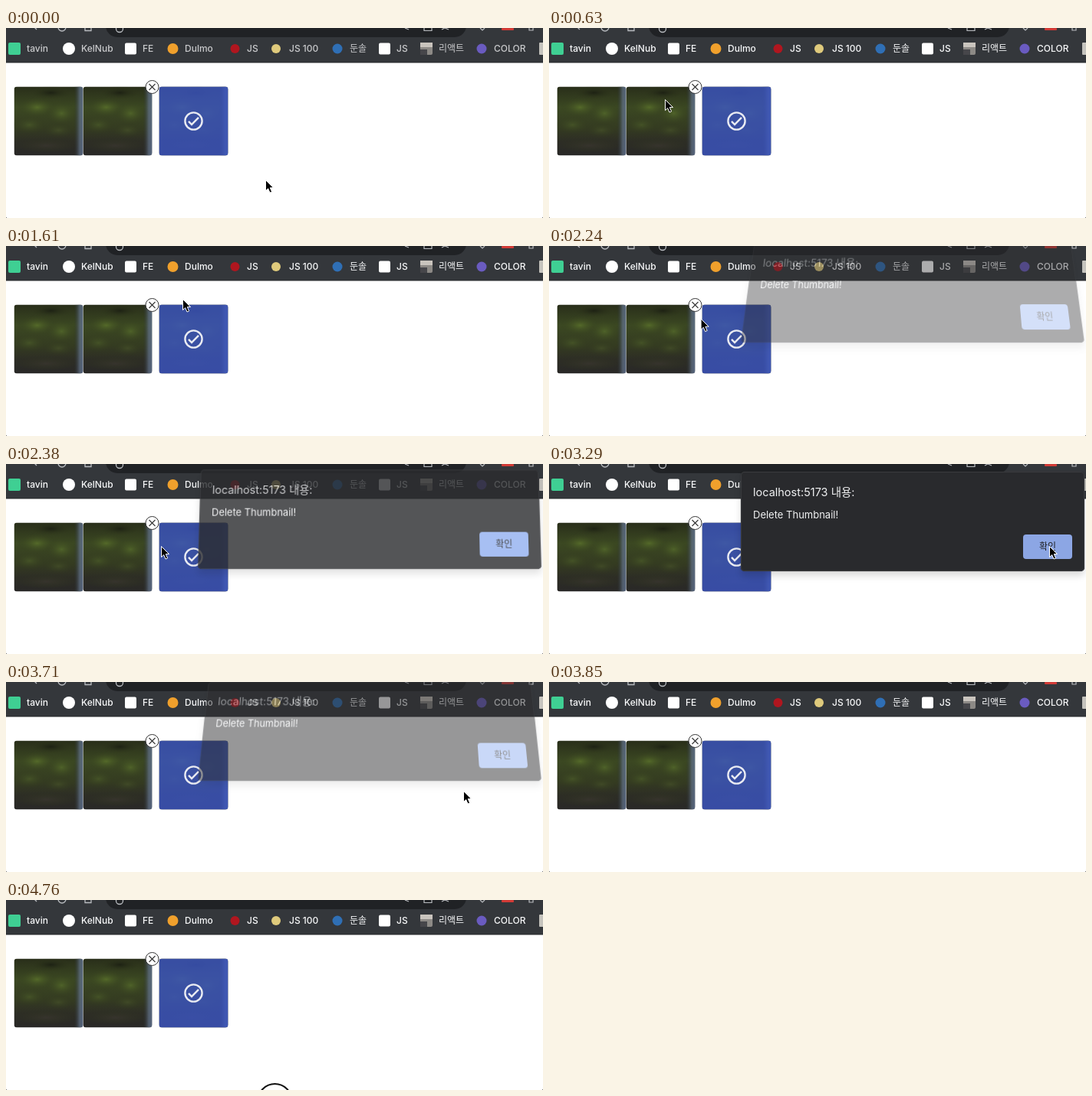
An HTML page with a canvas that plays this animation: 700 px wide and 248 px high, repeating every 4.83 s.

```html
<!DOCTYPE html>
<html lang="ko">
<head>
<meta charset="utf-8">
<title>Thumbnail delete demo</title>
<style>
  html, body { margin: 0; width: 100%; height: 100%; overflow: hidden; background: #fff; }
  body { position: relative; font-family: Inter, "Noto Sans CJK KR", "Noto Sans CJK", sans-serif; }
  canvas { position: absolute; left: 0; top: 0; }
  #dialog {
    position: absolute; left: 250px; top: 10px; width: 448px; height: 130px;
    border-radius: 5px; background: #292a2d; color: #f1f2f3;
    box-shadow: inset 0 0 0 1px #3a3b3e, 0 0 1px #222, 0 6px 10px rgba(0, 0, 0, .14);
    transform-origin: 50% 100%;
  }
  #dialog * { position: absolute; white-space: nowrap; }
  #title { left: 16px; top: 17px; font-size: 14.5px; line-height: 20px; }
  #message { left: 16px; top: 47px; font-size: 13px; line-height: 18px; }
  #ok {
    left: 368px; top: 82px; width: 64px; height: 32px; border-radius: 4px;
    background: #91aff0; color: #202124; font-size: 12px; line-height: 31px; text-align: center;
  }
  #ok.hover { background: #8ca6e4; }
  #cursor { position: absolute; left: 0; top: 0; overflow: visible; }
</style>
</head>
<body>
<canvas id="page" width="700" height="248"></canvas>
<div id="dialog">
  <div id="title">localhost:5173 내용:</div>
  <div id="message">Delete Thumbnail!</div>
  <div id="ok">확인</div>
</div>
<svg id="cursor" width="14" height="20">
  <path d="M.5 .5V14.6L3.7 11.6 6 17 8.6 15.9 6.3 10.6H10.6Z" fill="#000" stroke="#fff" stroke-width="1"/>
</svg>
<script>
const LOOP = 4830, STEP = 70;
const $ = id => document.getElementById(id);
const ctx = $('page').getContext('2d');
const dialog = $('dialog'), cursor = $('cursor'), ok = $('ok');

// time, x, y of the pointer tip
const PATH = [
  [0, 338, 198], [70, 325, 190], [350, 176, 112], [420, 176, 112], [630, 151, 93],
  [770, 148, 90], [840, 148, 90], [1120, 180, 84], [1400, 234, 72], [1470, 236, 70],
  [1540, 236, 70], [1610, 230, 69], [1750, 194, 75], [1890, 194, 75], [1960, 191, 76],
  [2030, 191, 76], [2380, 202, 107], [2590, 232, 183], [2800, 350, 219], [3010, 560, 195],
  [3150, 640, 135], [3220, 650, 113], [3290, 652, 107], [3500, 652, 107], [3640, 627, 120],
  [3710, 596, 142], [3780, 540, 213], [3850, 500, 260]
];

// label, text x, icon centre x, icon radius, icon colour, square icon
const BOOKMARKS = [
  ['tavin', 27, 11, 8, '#3fcf93', true],
  ['KelNub', 98, 82, 8, '#fff', false],
  ['FE', 178, 162.5, 7.5, '#fff', true],
  ['Dulmo', 233, 217.5, 7, '#f0a02c', false],
  ['JS', 314, 298.5, 6, '#b0161f', false],
  ['JS 100', 369, 352, 6, '#dfca7c', false],
  ['둔솔', 448, 432, 6.5, '#2f6fb5', false],
  ['JS', 509, 493.5, 7.5, '#fff', true],
  ['리액트', 564, 548, 8, '#8d8a86', true],
  ['COLOR', 636, 620, 6.5, '#6a5bc0', false]
];

const clamp = v => Math.max(0, Math.min(1, v));
const smooth = v => { v = clamp(v); return v * v * (3 - 2 * v); };

function box(x, y, w, h, r, fill) {
  ctx.fillStyle = fill;
  ctx.beginPath();
  ctx.roundRect(x, y, w, h, r);
  ctx.fill();
}

function disc(x, y, r, fill) {
  ctx.beginPath();
  ctx.arc(x, y, r, 0, 7);
  if (fill) { ctx.fillStyle = fill; ctx.fill(); }
}

function line(color, width, ...points) {
  ctx.strokeStyle = color;
  ctx.lineWidth = width;
  ctx.beginPath();
  points.forEach(([x, y]) => ctx.lineTo(x, y));
  ctx.stroke();
}

function toolbar(light) {
  box(0, 0, 700, 45, 0, '#34373b');
  box(0, 44.5, 700, 1, 0, '#26282b');
  box(130, -18, 470, 30, 15, '#202225');
  const gray = '#b9bcc0';
  line(gray, 1.3, [36, -2], [40, 2]);
  ctx.beginPath(); ctx.arc(73, -1, 5, 0, Math.PI); ctx.stroke();
  line(gray, 1.3, [103, 0], [103, 3.5], [111, 3.5], [111, 0]);
  disc(148, 1, 4.5); ctx.stroke();
  line(gray, 1.2, [520, 0], [525, 2]);
  line(gray, 1.2, [545, 0], [545, 3.5], [555, 3.5], [555, 0]);
  line(gray, 1.2, [568, 2], [572, 0], [577, 2]);
  line(gray, 1.2, [618, 0], [621, 3], [624, 0]);
  box(646, 0, 16, 3, 1, '#d23b36');
  line(gray, 1.2, [682, 0], [682, 3], [687, 3], [687, 0]);

  ctx.font = '500 12px Inter, "Noto Sans CJK KR", "Noto Sans CJK", sans-serif';
  for (const [label, x, cx, r, color, square] of BOOKMARKS) {
    if (square) box(cx - r, 27 - r, r * 2, r * 2, 2, color);
    else disc(cx, 27, r, color);
    ctx.fillStyle = `rgba(248,249,250,${light})`;
    ctx.fillText(label, x, 31);
  }
  box(540, 19, 16, 6, 0, '#c9c4bd');
  box(540, 28, 9, 7, 0, '#46464a');
  box(695, 19, 7, 16, 1, '#c5c3bd');
}

function blob(x, y, rx, ry, color) {
  ctx.save();
  ctx.translate(x, y);
  ctx.scale(rx, ry);
  const g = ctx.createRadialGradient(0, 0, 0, 0, 0, 1);
  g.addColorStop(0, color);
  g.addColorStop(1, 'rgba(50,58,28,0)');
  ctx.fillStyle = g;
  ctx.fillRect(-1, -1, 2, 2);
  ctx.restore();
}

function photo(x, tint) {
  ctx.save();
  ctx.beginPath();
  ctx.roundRect(x, 76.5, 90, 90, 4);
  ctx.clip();
  ctx.translate(x, 76.5);
  const g = ctx.createLinearGradient(0, 0, 0, 90);
  [[0, '#292e1a'], [.3, '#3b4822'], [.6, '#343b21'], [.8, '#2d2d25'], [1, '#292827']]
    .forEach(([at, c]) => g.addColorStop(at, c));
  ctx.fillStyle = g;
  ctx.fillRect(0, 0, 90, 90);
  blob(30, 27, 26, 14, 'rgba(94,119,44,.7)');
  blob(62, 35, 22, 16, 'rgba(90,114,44,.65)');
  blob(20, 50, 22, 12, 'rgba(78,96,42,.6)');
  blob(58, 57, 20, 10, 'rgba(76,90,43,.5)');
  blob(48, 8, 28, 9, 'rgba(22,25,16,.7)');
  blob(42, 77, 40, 9, 'rgba(61,56,49,.6)');
  const fall = ctx.createLinearGradient(78, 0, 90, 0);
  fall.addColorStop(0, 'rgba(40,46,48,0)');
  fall.addColorStop(.6, 'rgba(92,107,127,.75)');
  fall.addColorStop(1, 'rgba(96,114,145,.85)');
  ctx.fillStyle = fall;
  ctx.fillRect(78, 0, 12, 90);
  if (tint) {
    ctx.fillStyle = 'rgba(59,85,192,.82)';
    ctx.fillRect(0, 0, 90, 90);
  }
  ctx.restore();
}

const tick = new Path2D('M16.59 7.58 10 14.17 7.41 11.59 6 13 10 17 18 9Z');

function thumbs() {
  photo(10.5);
  photo(100.5);
  photo(199.5, true);
  ctx.strokeStyle = '#e9ebf2';
  ctx.lineWidth = 2.4;
  disc(244.5, 121.5, 11.1); ctx.stroke();
  ctx.save();
  ctx.translate(244.5 - 12 * 1.23, 121.5 - 12 * 1.23);
  ctx.scale(1.23, 1.23);
  ctx.fillStyle = '#e9ebf2';
  ctx.fill(tick);
  ctx.restore();

  disc(190.5, 77, 8.5, '#fff');
  ctx.strokeStyle = '#333';
  ctx.lineWidth = 1;
  ctx.stroke();
  line('#333', 1.1, [186.5, 73], [194.5, 81]);
  line('#333', 1.1, [194.5, 73], [186.5, 81]);
}

function drawPage(t) {
  box(0, 0, 700, 248, 0, '#fff');
  toolbar(.76 + .24 * clamp(t / 280));
  thumbs();
  box(0, 247, 1, 1, 0, '#777');
  box(699, 247, 1, 1, 0, '#777');
  if (t >= 4760) {
    disc(350.5, 262, 22, '#fff');
    ctx.strokeStyle = '#111';
    ctx.lineWidth = 2;
    ctx.stroke();
  }
}

// The dialog tilts back and lifts as it fades.
function drawDialog(t) {
  const alpha = t < 3000 ? smooth((t - 2030) / 490) : 1 - smooth((t - 3500) / 415);
  const shown = t >= 2100 && t < 3850;
  dialog.style.visibility = shown ? 'visible' : 'hidden';
  if (!shown) return;
  const u = (1 - alpha) ** 1.4;
  dialog.style.opacity = alpha;
  dialog.style.transform = u < 1e-4 ? 'none' :
    `translateY(${-28 * u}px) matrix3d(1,0,0,0, 0,${1 + .15 * u},0,${-.0013 * u}, 0,0,1,0, 0,0,0,1)`;
  ok.className = t >= 3220 && t < 3570 ? 'hover' : '';
}

function drawCursor(t) {
  cursor.style.visibility = t < 3850 ? 'visible' : 'hidden';
  const i = PATH.findIndex(p => p[0] > t);
  if (i < 1) return;
  const [t0, x0, y0] = PATH[i - 1], [t1, x1, y1] = PATH[i];
  const k = (t - t0) / (t1 - t0);
  cursor.style.transform = `translate(${x0 + (x1 - x0) * k}px, ${y0 + (y1 - y0) * k}px)`;
}

const start = performance.now();
function frame() {
  const now = (performance.now() - start) % LOOP;
  const t = Math.floor(now / STEP) * STEP;
  drawPage(t);
  drawDialog(t);
  drawCursor(t);
  requestAnimationFrame(frame);
}
frame();
</script>
</body>
</html>
```
